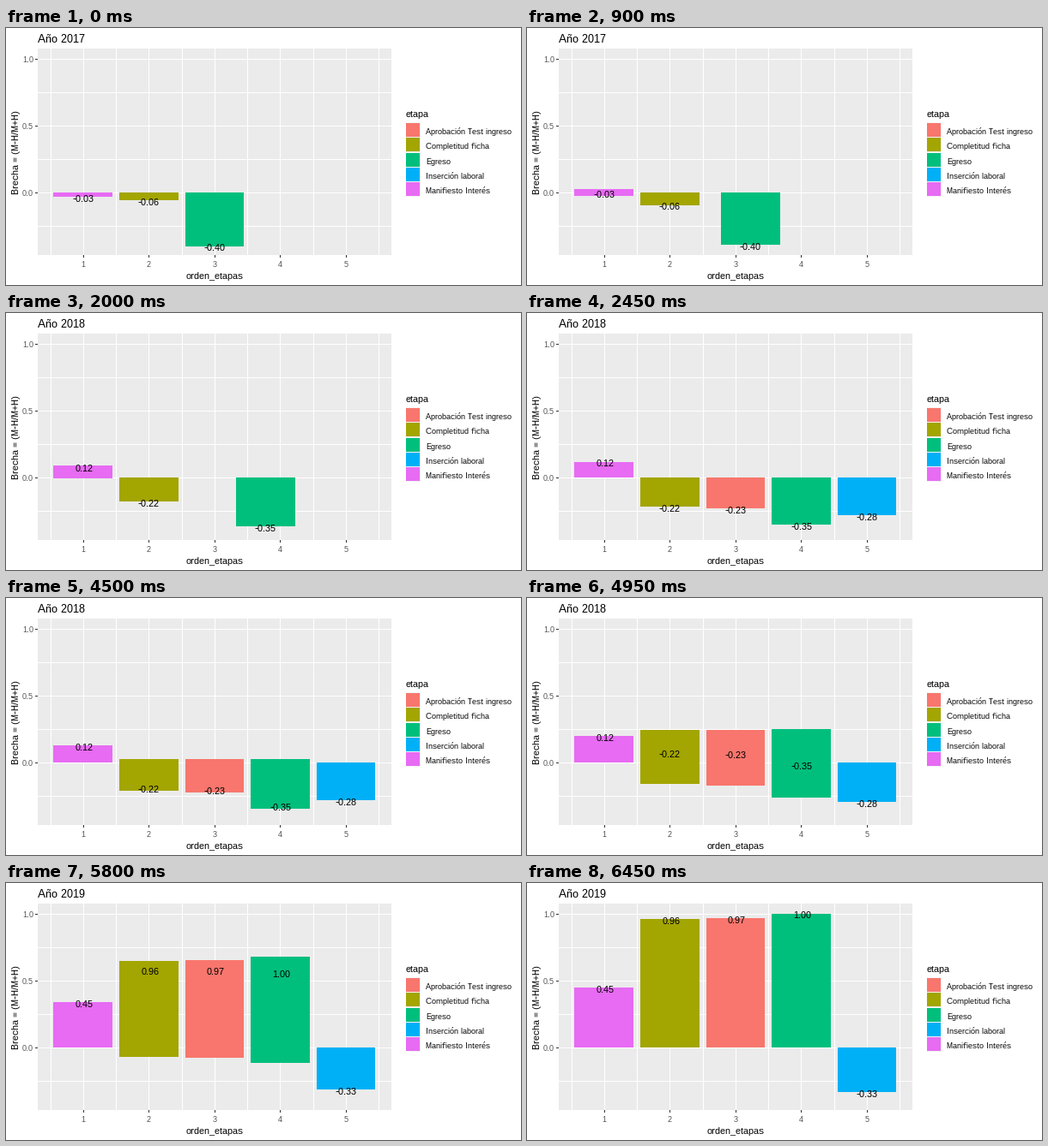
Write a matplotlib script that moves like this. It is 600x300 px and loops after 8 s.

```python
import matplotlib.pyplot as plt
from matplotlib.animation import FuncAnimation
from matplotlib.patches import Rectangle

W, H, DPI = 600, 300, 72
STEP_MS, CYCLE, HOLD, TWEEN = 50, 80, 9, 40

plt.rcParams.update({
    "font.family": "Liberation Sans",
    "text.hinting": "native",
    "text.hinting_factor": 1,
})

STAGES = {
    "Aprobación Test ingreso": "#F8766D",
    "Completitud ficha": "#A3A500",
    "Egreso": "#00BF7D",
    "Inserción laboral": "#00B0F6",
    "Manifiesto Interés": "#E76BF3",
}
TEST, FORM, GRAD, JOB, INTEREST = STAGES

# year -> stage -> (position, gap)
YEARS = {
    2017: {INTEREST: (1, -0.033), FORM: (2, -0.058), GRAD: (3, -0.40)},
    2018: {INTEREST: (1, 0.117), FORM: (2, -0.217), TEST: (3, -0.23),
           GRAD: (4, -0.353), JOB: (5, -0.281)},
    2019: {INTEREST: (1, 0.446), FORM: (2, 0.96), TEST: (3, 0.967),
           GRAD: (4, 1.0), JOB: (5, -0.333)},
}
YEAR_LIST = list(YEARS)

PANEL = (37, 24, 449, 265)


def px(x):
    return 55.45 + 76.53 * (x - 0.55)


def py(y):
    return 191.95 - 156.4 * y


def lerp(a, b, s):
    return a + (b - a) * s


fig = plt.figure(figsize=(W / DPI, H / DPI), dpi=DPI, facecolor="white")
ax = fig.add_axes([0, 0, 1, 1])
ax.set_xlim(0, W)
ax.set_ylim(H, 0)
ax.axis("off")


def box(x0, y0, x1, y1, color, z=1):
    rect = Rectangle((x0, y0), x1 - x0, y1 - y0, facecolor=color,
                     linewidth=0, antialiased=False, zorder=z)
    return ax.add_patch(rect)


def label(x, y, s, size, color="black", ha="left", **kw):
    return ax.text(x, y, s, fontsize=size, color=color, ha=ha,
                   va="baseline", zorder=5, **kw)


def draw_panel():
    left, top, right, bottom = PANEL
    box(*PANEL, "#EBEBEB")
    for i in range(1, 12):
        x = round(px(i / 2))
        if x < right:
            box(x, top, x + 1, bottom, "white")
    for i in range(-1, 5):
        y = round(py(i / 4))
        box(left, y, right, y + 1, "white")
    for i in range(1, 6):
        x = round(px(i))
        box(x, bottom, x + 1, bottom + 3, "#333333")
        label(x, 279, str(i), 9, "#4D4D4D", "center")
    for v in (0, 0.5, 1):
        y = round(py(v))
        box(left - 3, y, left, y + 1, "#333333")
        label(32, y + 4, f"{v:.1f}", 9, "#4D4D4D", "right")
    label(243, 293, "orden_etapas", 11, ha="center")
    label(15, 145, "Brecha = (M-H/M+H)", 11, ha="center",
          rotation=90, rotation_mode="anchor")


def draw_legend():
    label(466, 104, "etapa", 11)
    box(466, 110, 483, 197, "#F2F2F2")
    for i, (name, color) in enumerate(STAGES.items()):
        y = round(111 + 17.28 * i)
        box(466, y, 482, y + 16, color, 2)
        label(489, y + 13, name, 9)


draw_panel()
draw_legend()
title = label(37, 17, "", 13)
bars = {k: box(0, 0, 0, 0, c, 3) for k, c in STAGES.items()}
tags = {k: label(0, 0, "", 11, ha="center") for k in STAGES}


def place(name, start, end, s):
    (xa, va), (xb, vb) = start, end
    x = lerp(xa, xb, s)
    low = lerp(min(va, 0), min(vb, 0), s)
    high = lerp(max(va, 0), max(vb, 0), s)
    x0, x1 = round(px(x - 0.45)), round(px(x + 0.45))
    y0, y1 = round(py(high)), round(py(low))
    bars[name].set_bounds(x0, y0, x1 - x0, y1 - y0)
    value = va if s < 0.5 else vb
    # positive labels carry a leading blank, which moves them right
    shift = 1.5 if value > 0 else 0
    tags[name].set_position((px(x) + shift, round(py(lerp(va, vb, s)) + 5.8)))
    tags[name].set_text(f"{value:.2f}")


def update(n):
    part, k = divmod(n, CYCLE)
    s = min(max(k - HOLD, 0), TWEEN) / TWEEN
    before, after = YEAR_LIST[part], YEAR_LIST[part + 1]
    title.set_text(f"Año {before if s < 0.5 else after}")
    for name in STAGES:
        end = YEARS[after][name]
        start = YEARS[before].get(name)
        shown = start is not None or s == 1
        bars[name].set_visible(shown)
        tags[name].set_visible(shown)
        if shown:
            place(name, start or end, end, s)
    return [title, *bars.values(), *tags.values()]


anim = FuncAnimation(fig, update, frames=2 * CYCLE, interval=STEP_MS,
                     init_func=lambda: update(0), repeat=True, repeat_delay=0)
plt.show()
```
